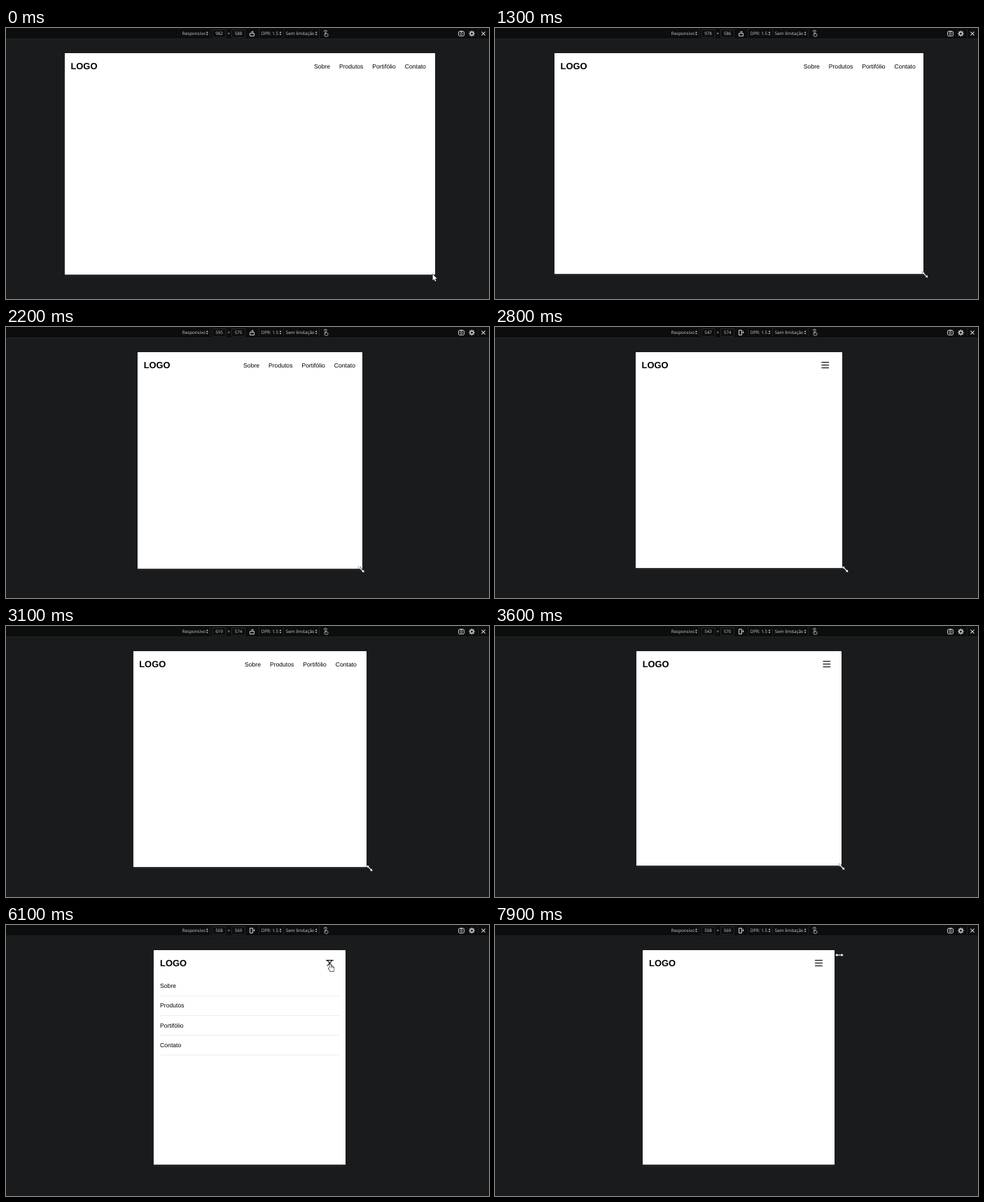
These frames come from a looping animation (690 px wide and 388 px high, 8.5 s). An HTML page with a canvas:

```html
<!DOCTYPE html>
<html lang="pt-BR">
<head>
<meta charset="utf-8">
<title>Menu responsivo</title>
<style>
html, body { margin: 0; width: 100%; height: 100%; overflow: hidden; background: #191b1d; }
canvas { display: block; }
</style>
</head>
<body>
<canvas id="stage" width="690" height="388"></canvas>
<script>
const ctx = document.getElementById('stage').getContext('2d');
const LOOP = 8500, STEP = 100;
const S = 0.5387;              // stage pixels per page pixel
const MID = 348.3, TOP = 36;
const HEAD = 54.5;             // middle of the page header
const PAD = 16 * S, GAP = 24 * S, BAR = 2 * S;
const BREAK = 600;
const DROP = 3900, OPEN = 4850, CLOSE = 6085, LEAVE = 7800;
const LINKS = ['Sobre', 'Produtos', 'Portifólio', 'Contato'];
const PAGE = 'px "Liberation Sans", Arial, sans-serif';
const UI = '6.25px "Open Sans", "Noto Sans", sans-serif';
const INK = '#cfcfd1', RULE = '#27282a';

// Turning points of the drag
const drag = [
  { t: 1285, w: 982, h: 588 },
  { t: 1300, w: 978, h: 586 },
  { t: 1850, w: 735, h: 576 },
  { t: 2400, w: 535, h: 574 },
  { t: 2650, w: 530, h: 574 },
  { t: 3230, w: 632, h: 574 },
  { t: 3800, w: 508, h: 569 }
];

const clamp = v => Math.max(0, Math.min(1, v));
const mix = (a, b, p) => a + (b - a) * p;
const smooth = p => p * p * (3 - 2 * p);

function size(t) {
  const i = Math.max(1, drag.findIndex(d => d.t > t));
  const [a, b] = t >= drag.at(-1).t ? drag.slice(-2) : drag.slice(i - 1, i + 1);
  const p = smooth(clamp((t - a.t) / (b.t - a.t)));
  return { w: mix(a.w, b.w, p), h: mix(a.h, b.h, p) };
}

// CSS "ease": cubic-bezier(.25, .1, .25, 1)
function ease(x) {
  x = clamp(x);
  const bez = (u, a, b) => 3 * (1 - u) ** 2 * u * a + 3 * (1 - u) * u * u * b + u ** 3;
  let lo = 0, hi = 1;
  for (let i = 0; i < 24; i++) {
    const m = (lo + hi) / 2;
    if (bez(m, 0.25, 0.25) < x) lo = m; else hi = m;
  }
  return bez(lo, 0.1, 1);
}

// Share of the menu transition that is open
const shown = (t, dur) => t < CLOSE ? ease((t - OPEN) / dur) : 1 - ease((t - CLOSE) / dur);

function text(str, x, y, font, color, align = 'left') {
  ctx.font = font;
  ctx.fillStyle = color;
  ctx.textAlign = align;
  ctx.fillText(str, x, y);
}

function rect(x, y, w, h, color) {
  ctx.fillStyle = color;
  ctx.fillRect(x, y, w, h);
}

function box(x, y, w, h, color, width = 1, r = 0) {
  ctx.beginPath();
  ctx.roundRect(x, y, w, h, r);
  ctx.strokeStyle = color;
  ctx.lineWidth = width;
  ctx.stroke();
}

function line(x1, y1, x2, y2, color, width) {
  ctx.beginPath();
  ctx.moveTo(x1, y1);
  ctx.lineTo(x2, y2);
  ctx.strokeStyle = color;
  ctx.lineWidth = width;
  ctx.stroke();
}

function place(x, y, angle, draw) {
  ctx.save();
  ctx.translate(x, y);
  ctx.rotate(angle);
  draw();
  ctx.restore();
}

// Triangle whose tip lies in direction "angle"
function tip(x, y, angle, r, color) {
  place(x, y, angle, () => {
    ctx.beginPath();
    ctx.moveTo(r, 0);
    ctx.lineTo(-r / 2, -r);
    ctx.lineTo(-r / 2, r);
    ctx.fillStyle = color;
    ctx.fill();
  });
}

function select(label, x, arrowX) {
  text(label, x, 10.2, UI, INK);
  tip(arrowX, 6.4, -Math.PI / 2, 1.4, INK);
  tip(arrowX, 9.2, Math.PI / 2, 1.4, INK);
}

function field(value, x) {
  box(x, 2.5, 19, 11, RULE);
  text(value, x + 9.5, 10.2, UI, INK, 'center');
}

function rotateIcon(portrait) {
  if (portrait) {
    box(348.5, 4.5, 4, 7, INK);
    line(354.5, 5.5, 354.5, 8, INK, 0.7);
    tip(354.5, 8, Math.PI / 2, 1.4, INK);
  } else {
    box(348.5, 7.5, 6, 4, INK);
    line(350, 5.5, 352, 5.5, INK, 0.7);
    tip(352.4, 5.5, 0, 1.4, INK);
  }
}

function touchIcon() {
  box(455.8, 5, 1.4, 4, INK, 0.6, 0.7);
  box(455, 8, 5, 4, INK, 0.8, 1.5);
  ctx.beginPath();
  ctx.arc(456.4, 5.4, 2.2, Math.PI, 0);
  ctx.stroke();
}

function cameraIcon() {
  box(646.6, 5, 7.8, 6.4, INK, 1, 1);
  rect(648.6, 4, 3.8, 1.2, INK);
  box(649, 6.7, 3, 3, INK, 0.9, 1.5);
}

function gearIcon() {
  box(663.2, 5.7, 4.6, 4.6, INK, 1.5, 2.3);
  for (let i = 0; i < 8; i++)
    place(665.5, 8, i * Math.PI / 4, () => rect(2.6, -0.6, 1.7, 1.2, INK));
}

function toolbar(w, h) {
  rect(0, 0, 690, 15, '#0c0d0d');
  rect(0, 15, 690, 0.6, RULE);
  for (const x of [291, 361, 396, 447, 674]) rect(x, 1, 1, 13, '#1f2022');
  select('Responsivo', 251.8, 287.4);
  field(w, 295);
  text('×', 318.2, 10.2, UI, INK, 'center');
  field(h, 322.5);
  rotateIcon(w < h);
  select('DPR: 1.5', 364.7, 392);
  select('Sem limitação', 399.8, 443.2);
  touchIcon();
  cameraIcon();
  gearIcon();
  for (const d of [-2.7, 2.7]) line(682 - d, 5.3, 682 + d, 10.7, INK, 1.1);
}

function hamburger(right, t) {
  const p = shown(t, 300), x = right - 42 * S;
  const bar = (y, turn) => place(x, y, turn * Math.PI * 0.75,
    () => rect(-10 * S, -BAR / 2, 20 * S, BAR, '#000'));
  if (t < OPEN || t >= CLOSE) bar(HEAD - 4, 0);
  bar(HEAD, p);
  bar(HEAD + 4 * (1 - p), -p);
}

function menu(left, right, h, t) {
  const p = shown(t, 600), top = TOP + 70 * S, row = 52.4 * S;
  ctx.save();
  ctx.beginPath();
  ctx.rect(left, top, right - left, (h - 70) * S * p);
  ctx.clip();
  LINKS.forEach((name, i) => {
    const y = top + i * row;
    text(name, left + PAD, y + 16.4, 16 * S + PAGE, '#000');
    rect(left + PAD, y + row - BAR, right - left - 2 * PAD, BAR, '#eee');
  });
  ctx.restore();
}

function nav(right) {
  let x = right - GAP;
  for (const name of [...LINKS].reverse()) {
    text(name, x, HEAD + 3.1, 16 * S + PAGE, '#000', 'right');
    x -= ctx.measureText(name).width + GAP;
  }
}

function page({ w, h }, t) {
  const left = MID - w * S / 2;
  const x = Math.round(left), edge = Math.round(left + w * S), bottom = Math.round(TOP + h * S);
  ctx.save();
  ctx.shadowColor = 'rgba(155,155,155,.26)';
  ctx.shadowOffsetY = ctx.shadowBlur = 4 * S;
  rect(x, TOP, edge - x, bottom - TOP, '#fff');
  ctx.restore();

  text('LOGO', left + PAD, HEAD + 4.6, 'bold ' + 24 * S + PAGE, '#000');
  // The content is laid out slightly later than the frame
  const layout = size(t - 12).w, right = left + layout * S;
  if (layout > BREAK) nav(right);
  else {
    hamburger(right, t);
    menu(left, right, h, t);
  }
  for (const d of [2.5, 4.5]) line(edge - d, bottom - 0.8, edge - 0.8, bottom - d, '#d2d2d2', 0.5);
}

function arrow(x, y) {
  place(x, y, 0, () => {
    const shape = new Path2D('M0 0V8.8L2 7L3.4 10.2L4.8 9.6L3.5 6.5L6.2 6.4Z');
    ctx.strokeStyle = '#111';
    ctx.lineWidth = 1;
    ctx.stroke(shape);
    ctx.fillStyle = '#fff';
    ctx.fill(shape);
  });
}

function resizer(x, y, angle) {
  place(x, y, angle, () => {
    for (const [color, grow] of [['#222', 0.5], ['#fff', 0]]) {
      line(-4, 0, 4, 0, color, 1.2 + 2 * grow);
      tip(-3.8, 0, Math.PI, 2 + grow, color);
      tip(3.8, 0, 0, 2 + grow, color);
    }
  });
}

function hand(x, y) {
  place(x, y, 0, () => {
    for (const [color, grow] of [['#333', 0.6], ['#fff', 0]]) {
      const part = (px, py, w, h, r) => {
        ctx.beginPath();
        ctx.roundRect(px - grow, py - grow, w + 2 * grow, h + 2 * grow, r);
        ctx.fillStyle = color;
        ctx.fill();
      };
      part(-0.8, 0, 1.7, 7, 0.8);
      part(-1.2, 3.9, 6.2, 6.4, 2);
      part(-2.8, 5.6, 2.4, 1.8, 0.8);
    }
    for (let k = 1; k < 4; k += 1.4) line(k, 4, k, 5.8, '#444', 0.5);
  });
}

function cursor(t, { h }) {
  const diagonal = Math.PI / 4;
  if (t < 800) arrow(609.6, 352.5);
  else if (t < 1300) resizer(614.3, 354.8, diagonal);
  else if (t < DROP) resizer(MID + size(t + 30).w * S / 2 + 3, TOP + h * S + 1.6, diagonal);
  else if (t < LEAVE) {
    const p = 1 - (1 - clamp((t - DROP) / 800)) ** 3;
    (p < 0.99 ? arrow : hand)(mix(487, 463.6, p), mix(344, 56, p));
  }
  else if (t < LEAVE + STEP) arrow(477, 46);
  else resizer(492, 43, 0);
}

function draw(t) {
  const now = size(t);
  rect(0, 0, 690, 388, '#191b1d');
  toolbar(Math.round(now.w), Math.round(now.h));
  page(now, t);
  cursor(t, now);
}

ctx.textRendering = 'geometricPrecision';
const start = performance.now();
function tick() {
  const t = (performance.now() - start) % LOOP;
  draw(Math.floor(t / STEP) * STEP);
  requestAnimationFrame(tick);
}
tick();
</script>
</body>
</html>
```
